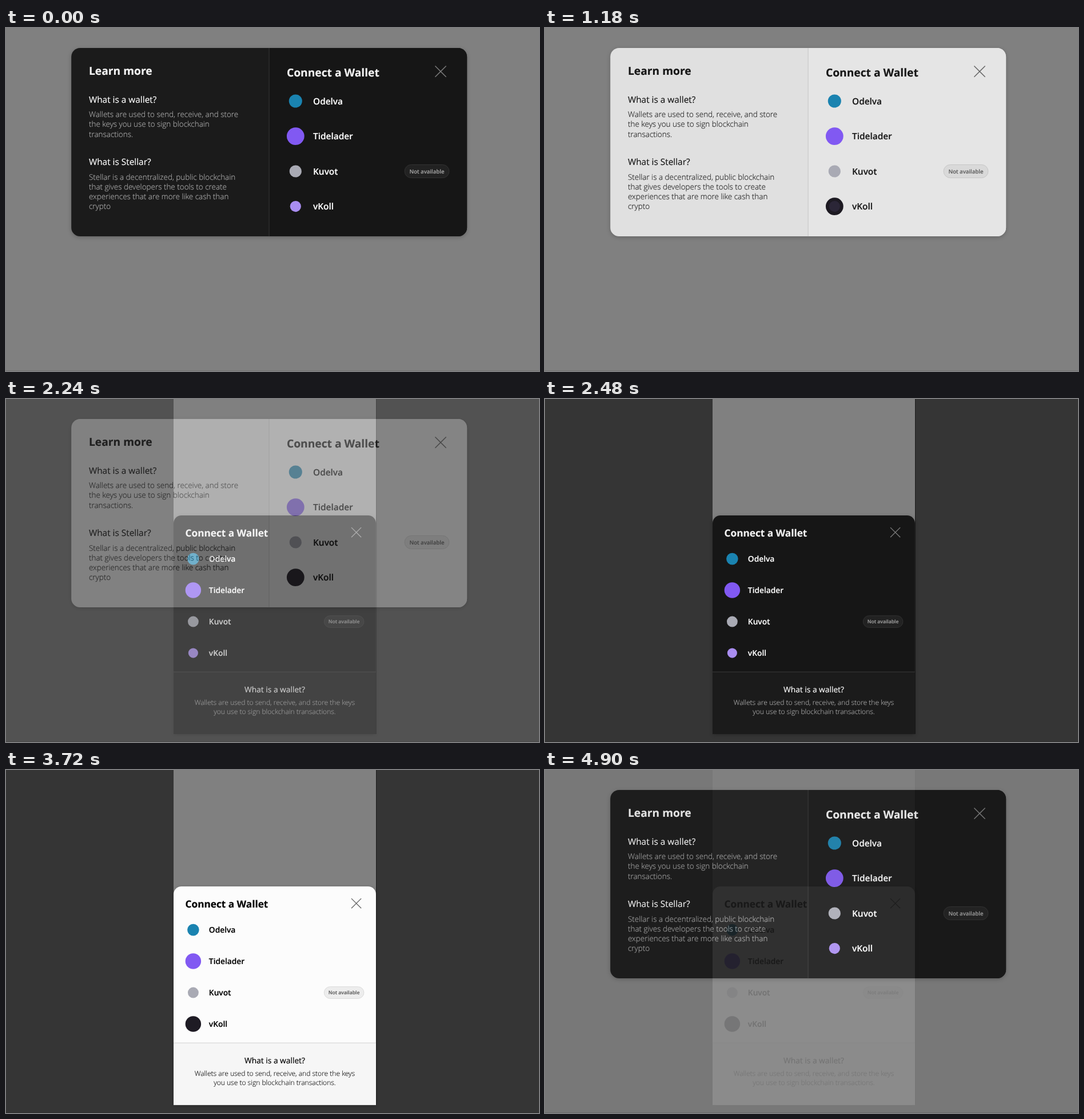
Recreate the animation shown at these times as an HTML page. Size 932 px wide and 601 px high, loop 4.96 s.

```html
<!DOCTYPE html>
<html lang="en">
<head>
<meta charset="utf-8">
<title>Wallet dialog themes</title>
<style>
  html, body { margin: 0; width: 100%; height: 100%; overflow: hidden; background: #808080; }
  svg { position: absolute; left: 0; top: 0; width: 932px; height: 601px; font-family: "Open Sans", sans-serif; }
  text { text-rendering: geometricPrecision; stroke-width: .2px; }
  .panel { filter: drop-shadow(0 2px 4px rgba(0, 0, 0, .22)); }
</style>
</head>
<body>
<script>
const HOLD = 700, STEP = 60, PERIOD = 1240;

const dark = {
  main: '#161616', side: '#1b1b1b', line: '#383838', title: '#f4f4f4', label: '#fff', body: '#a8a8a8',
  close: '#7a7a7a', pill: '#222', pillLine: '#343434', pillText: '#a0a0a0',
  last: ['#a98df0', 10]
};
const light = {
  main: '#fcfcfc', side: '#f6f6f6', line: '#d4d4d4', title: '#000', label: '#000', body: '#1c1c1c',
  close: '#666', pill: '#ededed', pillLine: '#d6d6d6', pillText: '#5c5c5c',
  last: ['#1e1b24', 16]
};

const text = (x, y, s, size, weight, fill, anchor = 'start') =>
  `<text x="${x}" y="${y}" font-size="${size}" font-weight="${weight}" fill="${fill}" stroke="${fill}" text-anchor="${anchor}">${s}</text>`;

const rect = (x, y, w, h, fill, more = '') =>
  `<rect x="${x}" y="${y}" width="${w}" height="${h}" fill="${fill}" ${more}/>`;

const lines = (x, y, list, c, anchor) =>
  list.map((s, i) => text(x, y + 18 * i, s, 14, 300, c.body, anchor)).join('');

// Title, close button and wallet rows; the origin is the title's baseline.
function wallets(x, y, w, c) {
  const rows = [
    ['Odelva', '#1a83b0', 12],
    ['Tidelader', '#8159f2', 16],
    ['Kuvot', '#a9aab4', 11],
    ['vKoll', ...c.last]
  ];
  const list = rows.map(([name, fill, r], i) => {
    const cy = 45 + 64 * i;
    return `<circle cx="16" cy="${cy}" r="${r}" fill="${fill}"/>` + text(48, cy + 6.2, name, 16, 600, c.label);
  }).join('');
  return `<g transform="translate(${x} ${y})">
    ${text(0, 0, 'Connect a Wallet', 20, 700, c.title)}
    <path d="M${w - 26}-19l20 20m0-20l-20 20" stroke="${c.close}" stroke-width="1.6"/>
    ${list}
    ${rect(w - 81.5, 161, 81, 24, c.pill, `rx="12" stroke="${c.pillLine}"`)}
    ${text(w - 41, 177, 'Not available', 10, 600, c.pillText, 'middle')}
  </g>`;
}

function desktop(c) {
  return rect(0, 0, 932, 601, '#808080') + `<g transform="translate(114.2 35) scale(.961)">
    ${rect(0, 0, 720, 343.5, c.side, 'rx="16" class="panel"')}
    <path d="M360 0h344a16 16 0 0 1 16 16v311.5a16 16 0 0 1-16 16H360z" fill="${c.main}"/>
    ${rect(359.4, 0, 1, 343.5, c.line)}
    ${text(32, 49, 'Learn more', 20, 700, c.title)}
    ${text(32, 99.4, 'What is a wallet?', 16, 400, c.label)}
    ${lines(32, 125.9, ['Wallets are used to send, receive, and store', 'the keys you use to sign blockchain', 'transactions.'], c)}
    ${text(32, 213.4, 'What is Stellar?', 16, 400, c.label)}
    ${lines(32, 239.9, ['Stellar is a decentralized, public blockchain', 'that gives developers the tools to create',
      'experiences that are more like cash than', 'crypto'], c)}
    ${wallets(392, 51.8, 296, c)}
  </g>`;
}

function mobile(c) {
  return rect(0, 0, 932, 601, '#353535') + rect(293, 0, 355, 587, '#1c1c1c') + rect(293, 0, 354, 587, '#808080') +
  `<g transform="translate(293 204) scale(.859)">
    <path class="panel" d="M0 446V16a16 16 0 0 1 16-16h380a16 16 0 0 1 16 16v430z" fill="${c.main}"/>
    ${rect(0, 319, 412, 127, c.side)}
    ${rect(0, 318.6, 412, 1.2, c.line)}
    ${wallets(24, 43.6, 364, c)}
    ${text(206, 360.4, 'What is a wallet?', 16, 400, c.label, 'middle')}
    ${lines(206, 386.6, ['Wallets are used to send, receive, and store the keys', 'you use to sign blockchain transactions.'], c, 'middle')}
  </g>`;
}

const scenes = [desktop(dark), desktop(light), mobile(dark), mobile(light)].map(markup => {
  document.body.insertAdjacentHTML('beforeend',
    `<svg viewBox="0 0 932 601">${markup}${rect(0, 600, 932, 1, 'rgba(0,0,0,.12)')}</svg>`);
  return document.body.lastElementChild;
});

// Each scene holds, then the next one fades in over it in tenths.
function draw(now) {
  const n = scenes.length, t = now % (PERIOD * n);
  const current = Math.floor(t / PERIOD), next = (current + 1) % n, s = t % PERIOD;
  const fade = s < HOLD ? 0 : (Math.floor((s - HOLD) / STEP) + 1) / 10;
  scenes.forEach((el, i) => {
    el.style.zIndex = i === next ? 2 : 1;
    el.style.opacity = i === current ? 1 : i === next ? fade : 0;
  });
  requestAnimationFrame(draw);
}
draw(performance.now());
</script>
</body>
</html>
```
